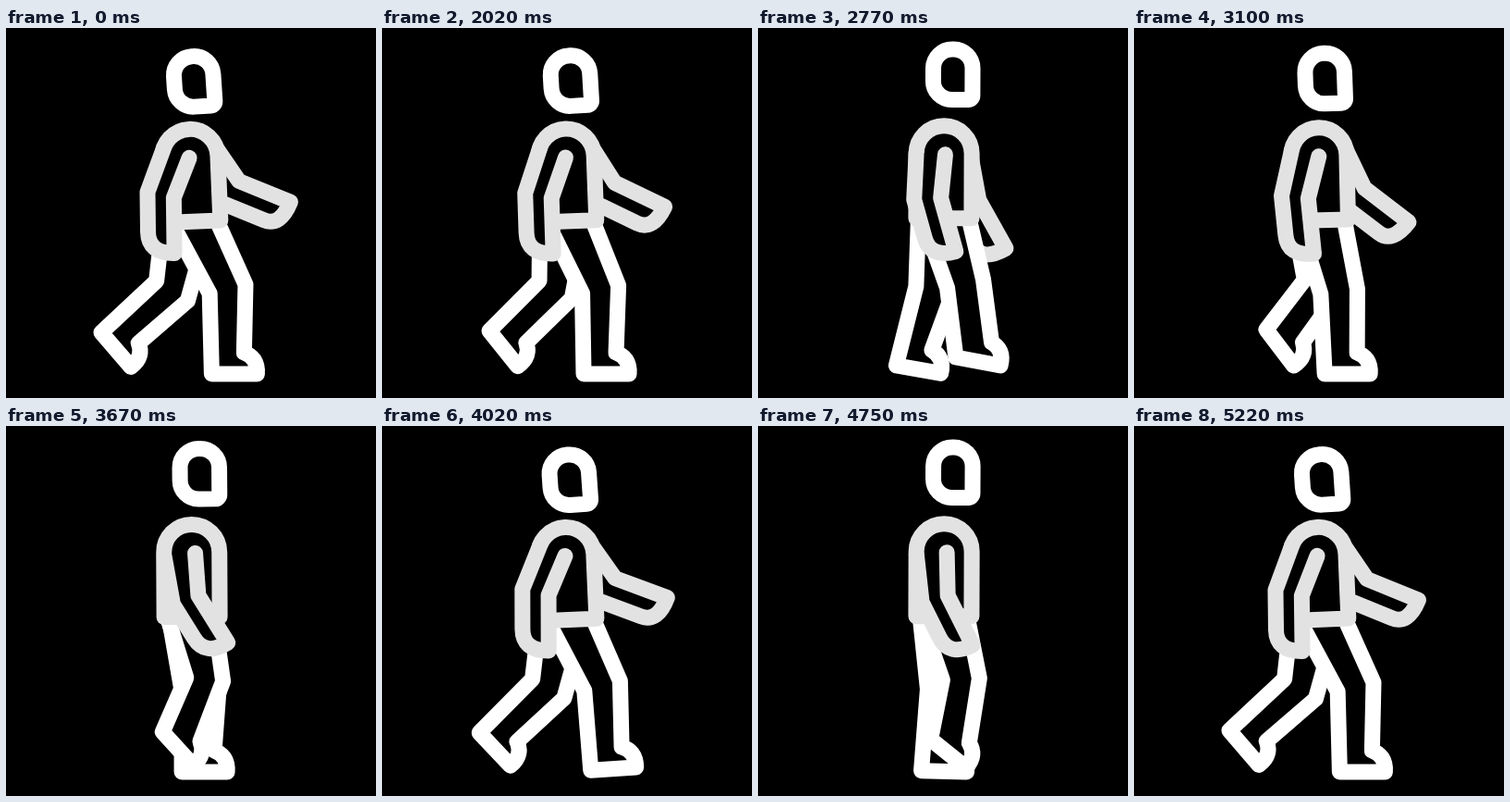
An HTML page that plays this animation: 400x400 px, repeating every 5250 ms.

```html
<!DOCTYPE html>
<html lang="en">
<head>
<meta charset="utf-8">
<title>Walking figure</title>
<style>
  html, body { margin: 0; width: 100%; height: 100%; overflow: hidden; background: #000; }
  svg { display: block; width: 100vw; height: 100vh; }
  path { fill: #000; stroke: #fff; stroke-width: 17; stroke-linecap: round; stroke-linejoin: round; }
  .top { stroke: #e2e2e2; }
</style>
</head>
<body>
<svg viewBox="0 0 400 400">
  <path id="farArm" class="top"/>
  <path id="farLeg"/>
  <path id="nearLeg"/>
  <path id="torso" class="top" d="M171 206V136A30 30 0 0 1 231 136V206Z"/>
  <path id="nearArm" class="top"/>
  <path id="head" d="M227 78H209A20 20 0 0 1 189 58V44A20.5 20.5 0 0 1 209.500 23.500H211A20.500 20.500 0 0 1 231.500 44V73.500A4.500 4.500 0 0 1 227 78Z"/>
</svg>
<script>
const LOOP = 5250, HOLD = 2020, START = 1995, STRIDE = 1025, WALK = 3225;
const { PI, sin, cos, acos, atan2, hypot } = Math;
const RAD = PI / 180;

const el = id => document.getElementById(id);
const setPath = (id, d) => el(id).setAttribute("d", d);
const add = ([x, y], [u, v], k = 1) => [x + u * k, y + v * k];
const polar = angle => [cos(angle), sin(angle)];
// Phase moved into the cycle that begins at `from`
const wrap = (p, from) => from + ((p - from) % 1 + 1) % 1;

// Smooth rise from a to peak and fall to b, between 0 and 1
function bump(p, a, peak, b) {
  const t = wrap(p, a);
  if (t > b) return 0;
  const u = t < peak ? (t - a) / (peak - a) : (b - t) / (b - peak);
  return sin(u * PI / 2) ** 2;
}

// Heel swings forward quickly, then travels back with the ground
function heelX(p) {
  const t = wrap(p, .5), back = 103, front = 234;
  if (t < .9) return back + (front - back) * sin((t - .5) / .4 * PI / 2);
  const u = (t - .9) / .6;
  return front - (front - back) * (u - .09 * sin(2 * PI * u));
}

function leg(id, p, hipY) {
  const lift = 48 * bump(p, .13, .575, .87);
  const toeUp = 25 * bump(p, .68, .91, 1);
  const heel = [heelX(p), 374 - lift - .42 * toeUp];
  const tilt = (1.1 * lift - toeUp) * RAD;
  const along = polar(tilt), up = polar(tilt - PI / 2);
  const foot = (x, y) => add(add(heel, along, x), up, y);

  // Both sides of the knee lie across the line from hip to ankle
  const ankle = foot(17, 11);
  const dx = ankle[0] - 201, dy = ankle[1] - hipY, len = hypot(dx, dy);
  const bend = 6 + 17 * bump(p, .25, .57, .8) + 14 * bump(p, .92, 1, 1.12);
  const knee = side => add([201 + dx / 2, hipY + dy / 2], [dy / len, -dx / len], bend + side);
  const hip = side => [201 + .08 * dx + side, hipY];

  setPath(id, `M${hip(-25)}L${knee(-20)}L${heel}L${foot(49, 0)}
    C${foot(50, 13)} ${foot(44, 20)} ${foot(35, 23)}L${knee(20)}L${hip(25)}`);
}

// Angles in degrees, 0 hanging down and positive forward
function arm(id, shoulder, upper, fore, cap) {
  const down = deg => polar((90 - deg) * RAD);
  const elbow = add(shoulder, down(upper), 52);
  const across = polar(-(upper + 2 * fore) / 3 * RAD);
  const outer = add(elbow, across, -14.5), inner = add(elbow, across, 14.5);
  const dir = down(fore);
  const wrist = add(outer, dir, 43), tip = add(inner, dir, 60);
  const reach = (tip[0] - wrist[0]) * dir[0] + (tip[1] - wrist[1]) * dir[1];

  // The outer edge leaves the round shoulder on a tangent
  const dx = outer[0] - shoulder[0], dy = outer[1] - shoulder[1];
  const turn = atan2(dy, dx) + acos(Math.min(1, 30 / hypot(dx, dy)));
  const start = add(shoulder, polar(turn), 30);

  setPath(id, `M${start}L${outer}L${wrist}Q${add(wrist, dir, reach)} ${tip}L${inner}L${add(shoulder, cap)}`);
}

// Steady strides, easing off over the last half stride
function phaseAt(t) {
  if (t < HOLD) return 0;
  const s = Math.min(t - START, WALK), slow = 2.5 * STRIDE;
  if (s < slow) return s / STRIDE;
  const rest = WALK - slow, u = (s - slow) / rest, v = rest / STRIDE / .5;
  return 2.5 + .5 * (v * u + (1 - v) * u * u);
}

function draw(now) {
  const p = phaseAt(now % LOOP);
  const sink = .43 + .57 * cos(4 * PI * (p + .035));
  el("torso").setAttribute("transform", `translate(${sink} ${3.5 * sink}) rotate(${-2.5 * sink} 201 208)`);
  el("head").setAttribute("transform", `translate(${-7.5 * sink} ${7.5 * sink}) rotate(${-4 * sink} 210.5 51)`);

  const hipY = 208 + 3 * sink;
  leg("nearLeg", p, hipY);
  leg("farLeg", p + .5, hipY);

  const shoulder = [201 - 2.1 * sink, 136 + 3.5 * sink];
  const near = sin(PI * (p + .04)) ** 2, far = 1 - near;
  arm("nearArm", shoulder, -40 + 41 * near ** .7, 44 * near, [-1 + 6.6 * near, 1]);
  arm("farArm", add(shoulder, [4, 9]), -36 + 92 * far, 70 * far ** 2, [22, -22]);
  requestAnimationFrame(draw);
}
requestAnimationFrame(draw);
</script>
</body>
</html>
```
